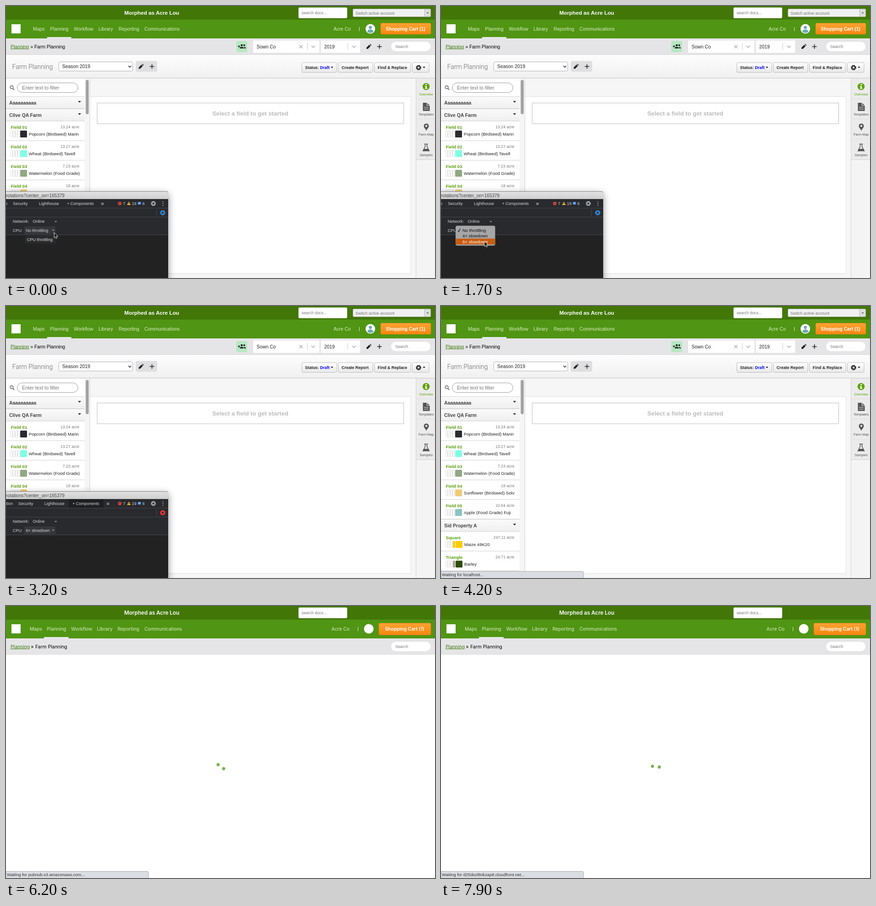
An HTML page that plays this animation: 939 by 596 pixels, repeating every 8 s.

```html
<!DOCTYPE html>
<html lang="en">
<head>
<meta charset="utf-8">
<title>Farm planning</title>
<style>
  html, body { margin: 0; width: 100%; height: 100%; overflow: hidden; background: #fff; }
  svg { display: block; width: 939px; height: 596px; font-family: "Liberation Sans", Arial, sans-serif; }
  text { white-space: pre; }
  .inter { font-family: Inter, sans-serif; }
  .light { font-family: Roboto, sans-serif; font-weight: 300; }
</style>
</head>
<body>
<svg id="stage" viewBox="0 0 939 596">
  <defs>
    <linearGradient id="orange" x2="0" y2="1"><stop stop-color="#fca233"/><stop offset="1" stop-color="#f7860f"/></linearGradient>
    <linearGradient id="button" x2="0" y2="1"><stop stop-color="#fff"/><stop offset="1" stop-color="#e8e8e8"/></linearGradient>
    <linearGradient id="toolbar" x2="0" y2="1"><stop stop-color="#fdfdfd"/><stop offset="1" stop-color="#f0f0f0"/></linearGradient>
    <linearGradient id="group" x2="0" y2="1"><stop stop-color="#fbfbfb"/><stop offset="1" stop-color="#efefef"/></linearGradient>
    <linearGradient id="titlebar" x2="0" y2="1"><stop stop-color="#e2e2e2"/><stop offset="1" stop-color="#cecece"/></linearGradient>
    <filter id="shadow" x="-20%" y="-20%" width="150%" height="150%">
      <feDropShadow dx="0" dy="5" stdDeviation="8" flood-opacity=".45"/>
    </filter>
    <clipPath id="cropClip"><rect width="161" height="596"/></clipPath>
  </defs>
</svg>
<script>
const text = (x, y, str, size = 10.36, fill = '#222', more = '') =>
  `<text x="${x}" y="${y}" font-size="${size}" fill="${fill}" ${more}>${str}</text>`;
const rect = (x, y, w, h, fill, more = '') =>
  `<rect x="${x}" y="${y}" width="${w}" height="${h}" fill="${fill}" ${more}/>`;
const boxed = (x, y, w, h, fill, stroke, r = 0) =>
  rect(x + .5, y + .5, w - 1, h - 1, fill, `stroke="${stroke}" rx="${r}"`);
const path = (d, fill = 'none', more = '') => `<path d="${d}" fill="${fill}" ${more}/>`;
const line = (d, color, width = 1) => path(d, 'none', `stroke="${color}" stroke-width="${width}"`);
const dot = (x, y, r, fill, more = '') => `<circle cx="${x}" cy="${y}" r="${r}" fill="${fill}" ${more}/>`;
const group = (id, body, more = '') => `<g id="${id}" ${more}>${body}</g>`;
const down = (x, y, s, fill) => path(`M${x - s} ${y}h${2 * s}l${-s} ${s * 1.2}z`, fill);
const chevron = (x, y, color) => line(`M${x - 4} ${y - 2}l4 4 4-4`, color, 1.4);
const BOLD = 'font-weight="700"', END = 'text-anchor="end"', MID = 'text-anchor="middle"';

const gear = (x, y, r, fill) =>
  dot(x, y, r * .62, 'none', `stroke="${fill}" stroke-width="${r * .5}"`) +
  dot(x, y, r * .88, 'none', `stroke="${fill}" stroke-width="${r * .32}" stroke-dasharray="${r * .346}"`);
const pencil = (x, y) =>
  path(`M${x - 5} ${y + 5}v-3l6-6 3 3-6 6zM${x + 2} ${y - 5}l1.2-1.1 3 3L${x + 5} ${y - 2}z`, '#222');
const plus = (x, y) => line(`M${x - 5} ${y}h10M${x} ${y - 5}v10`, '#222', 1.5);
const magnifier = (x, y) =>
  dot(x - 1, y - 1, 3.3, 'none', 'stroke="#666" stroke-width="1.4"') + line(`M${x + 1.5} ${y + 1.5}l3.3 3.3`, '#666', 1.7);

function header(plain) {
  const font = plain ? 'class="inter"' : '';
  const nav = ['Maps', 'Planning', 'Workflow', 'Library', 'Reporting', 'Communications'];
  const xs = plain ? [52, 89.5, 142.5, 199, 244, 303] : [59, 96.5, 148.5, 202.5, 246.5, 303];
  const cart = plain ? 816 : 820, avatar = plain ? 794 : 797.5;
  return rect(0, 0, 939, 29, '#427708') + rect(0, 29, 939, 42, '#509513') + rect(0, 28.5, 939, 1, '#3b6d07') +
    text(319, 19, 'Morphed as Acre Lou', plain ? 11.7 : 11.8, '#fff', `${MID} ${plain ? 'font-weight="600"' : BOLD} ${font}`) +
    boxed(640, 3, 107, 24, '#fff', '#cfd8c5', 2) + text(647, 18, 'search docs...', 8.85, '#777') +
    nav.map((label, i) => text(xs[i], 54, label, 10.36, '#d9ecc5', font)).join('') +
    rect(plain ? 83 : 90, 68, plain ? 54 : 53, 3, '#e8e8ea') +
    text(plain ? 712.5 : 717, 54, 'Acre Co', 10.36, '#d9ecc5', font) +
    rect(plain ? 770 : 773, 46, 1, 9, '#d9ecc5') +
    dot(avatar, 50, 10.5, '#fff') +
    (plain ? '' : dot(avatar, 47, 3.4, '#6fa9b5') + path(`M${avatar - 6.5} 56.5q0-5 6.5-5t6.5 5q-6.5 5-13 0z`, '#6fa9b5')) +
    rect(cart, 37.5, 930 - cart, 26 - (plain ? 0 : 1.5), 'url(#orange)', 'rx="2.5" stroke="#d97c12" stroke-width=".6"') +
    text((cart + 930) / 2 - .5, 53.7, 'Shopping Cart (1)', 10.3, '#fff', `${MID} ${plain ? 'font-weight="600"' : BOLD} ${font}`) +
    rect(0, 71, 939, 36, '#e5e5e7') +
    text(10, 92.5, 'Planning', 10.36, '#3f7a0c', `text-decoration="underline" ${font}`) +
    text(plain ? 54.5 : 53.5, 92.5, '»', 10.36, '#000', font) +
    text(plain ? 64 : 62, 92.5, 'Farm Planning', 10.36, '#000', font) +
    rect(843, 78.5, 86, 20.5, '#fff', 'rx="10.25"') + text(852, 92, 'Search', 8.88, '#777');
}

function fieldRow(y, name, acres, crop, color, strip) {
  const x = strip ? 32 : 31;
  let out = text(10.5, y + 16.5, name, 9.62, '#5a9e0b', BOLD) + text(160.5, y + 16, `${acres} acre`, 8.75, '#777', END);
  for (let i = 0; i < 4; i++) {
    out += i === 3 && strip ? rect(26, y + 21, 5, 15, strip, 'rx="1"') : boxed(10 + i * 5, y + 21, 5, 15, '#fff', '#dcdcdc', 1);
  }
  return out + rect(x, y + 21, 15, 15, color, 'rx="1.5"') +
    text(x + 18.8, y + 32, crop, 9.6, '#222', 'clip-path="url(#cropClip)"') + rect(0, y + 42.5, 172, 1, '#cfcfcf');
}
const groupRow = (y, name) =>
  rect(0, y, 172, 27, 'url(#group)') + rect(0, y, 172, 1, '#d2d2d2') + rect(0, y + 26.5, 172, 1, '#cfcfcf') +
  text(7, y + 17.5, name, 10.36, '#444', BOLD) + down(161, y + 10, 3.3, '#333');

function sidebar() {
  return rect(0, 159, 172, 437, '#fff') + rect(172, 159, 11, 437, '#f6f6f6') + rect(183, 159, 1, 437, '#d0d0d0') +
    rect(174.5, 162, 6.5, 75, '#a2a2a2', 'rx="3"') + magnifier(13.5, 179) +
    boxed(24, 168, 134, 22, '#fff', '#9a9a9a', 11) + text(35, 183, 'Enter text to filter', 10.8, '#777') +
    groupRow(198, 'Aaaaaaaaaa') + groupRow(225, 'Clive QA Farm') +
    fieldRow(252, 'Field 01', '13.24', 'Popcorn (Birdseed) Marin', '#2a2b2e') +
    fieldRow(295, 'Field 02', '13.27', 'Wheat (Birdseed) Tavell', '#7fffe4') +
    fieldRow(338, 'Field 03', '7.23', 'Watermelon (Food Grade)', '#90a883') +
    fieldRow(381, 'Field 04', '18', 'Sunflower (Birdseed) Solvane', '#f0cc78') +
    fieldRow(424, 'Field 05', '10.64', 'Apple (Food Grade) Fuji', '#8bc3c3') +
    groupRow(467, 'Sid Property A') +
    fieldRow(494, 'Square', '247.11', 'Maize 48K20', '#ffcc00', '#ffcc00') +
    fieldRow(537, 'Triangle', '24.71', 'Barley', '#2f4d0a', '#b0a393');
}

function rightRail() {
  const icons = [
    dot(919.5, 176.5, 7.8, '#5fa30d') + rect(918.3, 171, 3, 2.6, '#fff') + path('M917 175.5h4v4.6h1.3v1.5H917v-1.5h1.2v-3H917z', '#fff'),
    path('M912.5 212h9l6 6v12h-15z', '#555') + line('M921.5 212v6h6M915 222h10M915 226h10', '#eee', 1.2),
    path('M920 273.500c-2-5-5.500-7-5.500-10.500a5.500 5.500 0 0 1 11 0c0 3.500-3.500 5.500-5.500 10.500z', '#555') + dot(920, 262.7, 2.2, '#ebebeb'),
    line('M915.5 302.500h8M917.500 302.500v5.500l-5 9.500h14l-5-9.500v-5.500', '#555', 1.5) + path('M915 313h9l2 4h-13z', '#555')
  ];
  return rect(897, 159, 42, 437, '#f4f4f4') + icons.map((icon, i) => {
    const y = 159 + i * 44.4;
    return rect(897, y, 42, 44.4, '#ebebeb') + rect(897, y + 44, 42, 1, '#cfcfcf') + icon +
      text(919.7, y + 36.5, ['Overview', 'Templates', 'Farm Map', 'Samples'][i], 7.3, i ? '#555' : '#5fa30d', MID);
  }).join('') + rect(897, 159, 1, 437, '#d2d2d2');
}

function page() {
  const button = (x, w, label) => boxed(x, 123.5, w, 22.5, 'url(#button)', '#bcbcbc', 2.5) +
    text(x + 7.5, 138, label, 8.95, '#222', BOLD);
  return rect(0, 0, 939, 596, '#f6f6f6') + header(false) +
    boxed(759, 6, 171, 18, '#f0f0f0', '#b5b5b5', 2) + rect(916, 6, 1, 18, '#b5b5b5') + rect(917, 7, 12, 16, '#dedede') +
    down(923, 14, 2.6, '#666') + text(765, 18.5, 'Switch active account', 8.88, '#777') +
    rect(12, 40, 20, 20, '#fff') +
    rect(504, 77, 24, 24, '#b7e8c3', 'rx="3"') + dot(516, 86, 2.3, '#222') + dot(521.500, 86, 2, '#222') +
    path('M511.500 93q0-3.500 4.500-3.500t4.500 3.500zM521 89.500q4 0 4 3.500h-3.500q0-2-.5-3.500z', '#222') + line('M507.500 88.500h5M510 86v5', '#222', 1.3) +
    rect(541, 75.500, 145, 27, '#fff') + rect(689, 75.500, 86, 27, '#fff') +
    text(548.5, 92.5, 'Sown Co') + text(696.5, 92.5, '2019') +
    line('M642 85.500l7 7M649 85.500l-7 7', '#aaa', 1.3) + rect(659, 81, 1, 15, '#ccc') + rect(747.5, 81, 1, 15, '#ccc') +
    chevron(672.5, 89, '#aaa') + chevron(761.5, 89, '#aaa') + pencil(794, 89) + plus(817.5, 89) +
    rect(0, 106, 939, 1, '#d4d4d4') + rect(0, 107, 939, 51, 'url(#toolbar)') + rect(0, 157.5, 939, 1.2, '#cbcbcb') +
    text(13.5, 137.5, 'Farm Planning', 14, '#666', 'class="light"') +
    boxed(115, 122, 163, 21, '#fff', '#b0b0b0', 3) + text(123, 136.2, 'Season 2019', 10.4) + line('M268 131l3 3 3-3', '#333', 1.6) +
    rect(284, 120.5, 47, 23.5, '#dfdfe1', 'rx="4"') + pencil(295.5, 132.5) + plus(319.5, 132.5) +
    button(647, 77.5, 'Status: <tspan fill="#00f">Draft</tspan>') + down(713.5, 133, 2.7, '#222') +
    button(727, 76.5, 'Create Report') + button(806, 80.5, 'Find &amp; Replace') + button(889, 37.5, '') +
    gear(903, 135, 5.8, '#333') + down(915, 133, 2.8, '#222') +
    rect(184, 198, 702, 388, '#fff') + line('M184 198.500h702.500v387.500H184', '#dedede') +
    boxed(199, 212, 672, 46.5, '#fff', '#bdbdbd') +
    text(534.7, 239.7, 'Select a field to get started', 13.1, '#bcbcbc', `${MID} ${BOLD}`) +
    sidebar() + rightRail();
}

function devtools() {
  const pale = '#d4d6d9';
  const tabs = text(-41, 436, 'Application', 9, pale) + text(15, 436, 'Security', 9, pale) + text(72, 436, 'Lighthouse', 9, pale) +
    dot(136.2, 432.7, 1.8, '#8a8c90') + text(141, 436, 'Components', 9, pale) + text(207.5, 436.5, '»', 13, pale);
  return rect(-12, 406, 367, 200, '#202122', 'rx="4" filter="url(#shadow)"') +
    path('M0 406.500h351q4 0 4 4V423H0z', 'url(#titlebar)') + text(0, 418.7, 'rotations?center_on=165379', 10.05, '#444') +
    rect(0, 423, 355, 78.500, '#292a2d') +
    group('hoverTab', rect(137, 423, 77, 19.500, '#1e1f21')) + group('tabs', tabs) +
    rect(0, 442.5, 355, 1, '#45464a') + rect(0, 462, 355, 1, '#45464a') + rect(0, 501, 355, 1, '#45464a') +
    dot(249, 432.7, 3.8, '#e5493a') + line('M247.500 431.200l3 3M250.500 431.200l-3 3', '#292a2d') + text(256, 436, '7', 9, pale) +
    path('M269 428.500l4 7.500h-8z', '#f2bb3a') + rect(268.5, 431, 1, 3, '#292a2d') + text(275.5, 436, '19', 9, pale) +
    rect(288.5, 429.2, 7, 6, '#3c82e8', 'rx="1"') + line('M290 431.200h4M290 433.200h3', '#fff', .8) + text(298.5, 436, '6', 9, pale) +
    gear(322.500, 432.8, 5.5, '#a0a2a5') + [429, 433, 437].map(y => dot(343.500, y, 1.1, '#b0b2b5')).join('') +
    rect(329, 446, 1, 14, '#45464a') +
    group('blueGear', gear(343, 453, 5.8, '#2f86d6')) + group('redGear', gear(343, 453, 5.8, '#f03434')) +
    text(14.7, 475.3, 'Network:', 9, pale) + text(58.5, 475.3, 'Online', 9, pale) + down(109, 471, 2.8, '#8d8f92') +
    text(14.7, 494.8, 'CPU:', 9, pale) + rect(40, 483, 68.500, 17, '#36373a', 'rx="1"') +
    `<text id="cpu" x="43.5" y="494.8" font-size="9.05" fill="${pale}"></text>` + down(103.500, 490, 2.8, '#8d8f92') +
    group('tooltip', rect(41, 503.500, 68, 17, '#292a2c', 'rx="1"') + text(46, 515.2, 'CPU throttling', 9, '#e2e2e2')) +
    group('menu', rect(32, 481.500, 86.500, 43.500, '#a6a6a6', 'rx="3.5" stroke="#6e6e6e" stroke-width=".7"') +
      '<rect id="highlight" x="32" width="86.5" height="12.8" fill="#c85c10"/>' + line('M37 491.500l2 3 3.500-7', '#111', 1.2) +
      ['No throttling', '4× slowdown', '6× slowdown'].map((s, i) => text(47, 494.5 + i * 12.5, s, 9.5, '#111', 'class="option"')).join(''));
}

const spinner = dot(-7.5, 0, 3.5, '#79b450') + dot(7.5, 0, 3.5, '#79b450');
const stage = document.getElementById('stage');
stage.innerHTML += group('page', page()) + group('devtools', devtools()) +
  group('blank', rect(0, 0, 939, 596, '#fff') + header(true) + group('logo', rect(12, 40, 20, 20, '#fff')) + group('spinner', spinner)) +
  group('status', path('M0 581.500h309q3 0 3 3V597H0z', '#dadde3', 'stroke="#a9abae"') +
    '<text id="statusText" x="2" y="592.3" font-size="9.3" fill="#333"></text>') +
  group('cursor', path('M0 0v11.300l2.600-2.400 1.700 4 2-.9-1.700-3.800H8z', '#000', 'stroke="#fff" stroke-width=".9"'));

const el = id => document.getElementById(id);
const show = (id, on) => el(id).setAttribute('display', on ? 'inline' : 'none');
const options = [...document.querySelectorAll('.option')];

// time, x, y of the pointer tip
const pointer = [[0, 105.5, 496.5], [400, 105.5, 496.5], [500, 105, 496], [800, 105, 496], [1100, 101, 500], [1600, 95, 515.5],
  [2400, 95, 515.5], [2900, 150, 436], [3100, 154, 430]];
function pointerAt(t) {
  const i = Math.max(1, pointer.findIndex(p => p[0] > t));
  const [t0, x0, y0] = pointer[i - 1], [t1, x1, y1] = pointer[i];
  const k = (t - t0) / (t1 - t0);
  return [x0 + (x1 - x0) * k, y0 + (y1 - y0) * k];
}

function draw(t) {
  const slowed = t >= 1900, reloaded = t >= 5000, menuOpen = t >= 900 && t < 1900;
  show('page', !reloaded);
  show('blank', reloaded);
  show('devtools', t < 3500);
  show('tooltip', t < 900);
  show('menu', menuOpen);
  show('hoverTab', t >= 2900);
  show('redGear', slowed);
  show('blueGear', !slowed);
  el('tabs').setAttribute('transform', `translate(${slowed ? 12 : 0} 0)`);
  el('cpu').textContent = slowed ? '6× slowdown' : 'No throttling';

  const picked = t < 1200 ? 0 : t < 1400 ? 1 : 2;
  el('highlight').setAttribute('y', 484.7 + picked * 12.5);
  options.forEach((o, i) => o.setAttribute('fill', i === picked ? '#fff' : '#111'));

  show('cursor', t < 3100);
  if (t < 3100) el('cursor').setAttribute('transform', `translate(${pointerAt(t)})`);

  show('logo', t >= 5900);
  show('spinner', t >= 6200);
  el('spinner').setAttribute('transform', `translate(470.3 352) rotate(${(t - 7200) * .3 - 24})`);

  show('status', t >= 4000 && (t < 7500 || t >= 7700));
  el('status').setAttribute('opacity', t >= 7000 && t < 7500 ? 1 - (t - 7000) / 600 : 1);
  const host = t < 6000 ? 'localhost' : t < 7700 ? 'pubnub.s3.amazonaws.com' : 'd25dozl8nkzap8.cloudfront.net';
  el('statusText').textContent = `Waiting for ${host}...`;
}

const start = performance.now();
function tick() {
  const t = (performance.now() - start) % 8000;
  draw(Math.floor(t / 100) * 100);
  requestAnimationFrame(tick);
}
tick();
</script>
</body>
</html>
```
